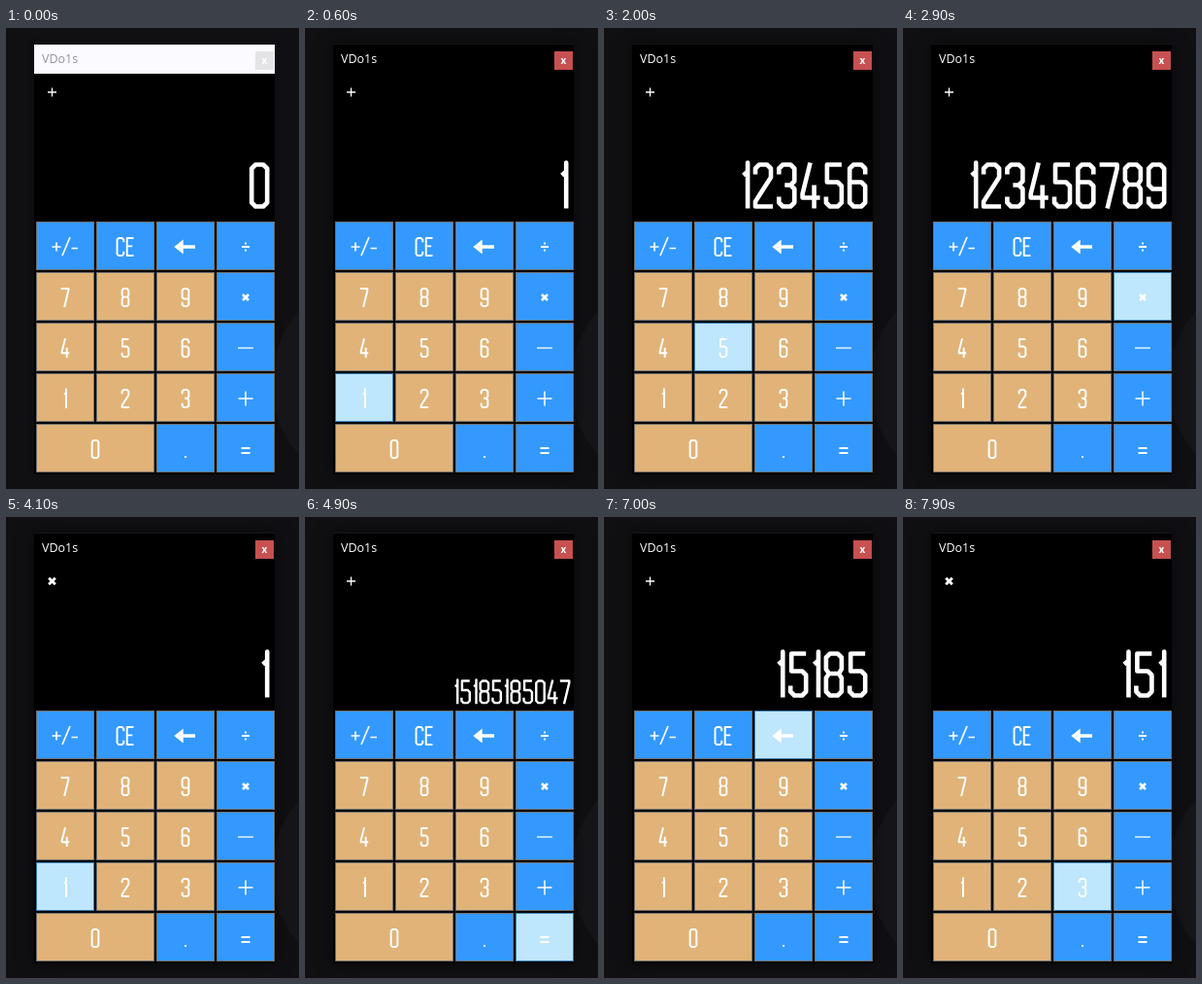
Animation of 302 by 474 pixels, one loop 8 s. Source, as an HTML page with a canvas:

```html
<!DOCTYPE html>
<html lang="en">
<head>
<meta charset="utf-8">
<title>Calculator</title>
<style>
  html, body { margin: 0; width: 100%; height: 100%; overflow: hidden; background: #101013; }
  canvas { display: block; }
</style>
</head>
<body>
<canvas id="stage" width="302" height="474" role="img" aria-label="Calculator multiplying 123456789 by 123"></canvas>
<script>
const ctx = document.getElementById('stage').getContext('2d');
const LOOP = 8000;
const BLUE = '#3399ff', TAN = '#e1b378', LIT = '#bee6fd';

// Condensed squared lettering: centre lines in a 16 x 43 box
const GLYPHS = {
  0: 'M4 0H12L16 4V39L12 43H4L0 39V4Z',
  1: 'M0 11L4.5 7V-2V45',
  2: 'M0 10V4L4 0H12L16 4V13L0 38V43H18',
  3: 'M0 10V4L4 0H12L16 4V17L12 21H6M12 21L16 25V39L12 43H4L0 39V33',
  4: 'M8 -2L0 30V34H18M12 21V45',
  5: 'M16 0H1V18H12L16 22V39L12 43H4L0 39V33',
  6: 'M16 10V4L12 0H4L0 4V39L4 43H12L16 39V22L12 18H0',
  7: 'M-2 0H16V4L6 45',
  8: 'M4 0H12L16 4V16L13 20.5L16 25V39L12 43H4L0 39V25L3 20.5L0 16V4ZM3 20.5H13',
  9: 'M0 33V39L4 43H12L16 39V4L12 0H4L0 4V21L4 25H16',
  C: 'M16 10V4L12 0H4L0 4V39L4 43H12L16 39V33',
  E: 'M16 0H0V43H16M0 20H13'
};
for (const c in GLYPHS) GLYPHS[c] = new Path2D(GLYPHS[c]);
const inkWidth = c => c === '1' ? 4.5 : 16;
const advance = c => c === '1' ? 12.4 : 24.3;

// Symbols as [path, line width], centred on 0,0
const SYMBOLS = {
  '+/-': ['M-13.5 0H-4.5M-9 -4.5V4.5M-3 9L5 -10M6.5 1.5H13', 1.7],
  '÷': ['M-4 0H4M-1 -3.5H1M-1 3.5H1', 1.8],
  '×': ['M-3 -3L3 3M3 -3L-3 3', 2.6],
  '−': ['M-8 0H8', 1.3],
  '+': ['M-7.5 0H7.5M0 -7.5V7.5', 1.5],
  'plus': ['M-4.5 0H4.5M0 -4.5V4.5', 1.3],
  '.': ['M-1 8H1', 2.2],
  '=': ['M-4.5 -1H4.5M-4.5 4H4.5', 2.2],
  '←': ['M10 0H-5M-9 0L-4 -4V4Z', 3.4]
};
for (const s in SYMBOLS) SYMBOLS[s][0] = new Path2D(SYMBOLS[s][0]);

const ROWS = [['+/-', 'CE', '←', '÷'], '789×', '456−', '123+', '0 .='];
const KEYS = ROWS.flatMap((row, r) => [...row].map((label, c) => ({
  label, x: 31 + c * 62, y: 199 + r * 52, w: label === '0' ? 122 : 60
}))).filter(key => key.label !== ' ');

// Timelines of [start ms, value]
const HOVER = [
  [0, ''], [400, '1'], [700, '2'], [900, '3'], [1200, '5'], [1300, '4'],
  [1500, '5'], [1700, '6'], [2000, '5'], [2100, '4'], [2200, '7'], [2400, '8'],
  [2600, '9'], [2900, '×'], [3400, '6'], [3500, '5'], [3600, '2'], [3700, '1'],
  [4200, '2'], [4400, '3'], [4600, '.'], [4700, '='], [5500, '+'], [5600, '−'],
  [5700, '×'], [5800, '←'], [7500, '×'], [7800, '6'], [7900, '3']
];
const DISPLAY = [
  [0, '0'], [500, '1'], [800, '12'], [1100, '123'], [1400, '1234'], [1600, '12345'],
  [1800, '123456'], [2300, '1234567'], [2500, '12345678'], [2800, '123456789'],
  [4100, '1'], [4300, '12'], [4500, '123'], [4900, String(123456789 * 123)],
  // Backspace presses
  ...[6100, 6400, 6500, 6700, 6800, 6900, 7100, 7200].map((t, i) => [t, '15185185047'.slice(0, 10 - i)])
];
const OPERATOR = [[0, 'plus'], [3300, '×'], [4900, 'plus'], [7700, '×']];
const at = (timeline, t) => timeline.findLast(([start]) => start <= t)[1];

function box(x, y, w, h, fill) {
  ctx.fillStyle = fill;
  ctx.fillRect(x, y, w, h);
}

function symbol(name, x, y, scale = 1) {
  const [path, width] = SYMBOLS[name];
  ctx.save();
  ctx.translate(x, y);
  ctx.scale(scale, scale);
  ctx.lineWidth = width;
  ctx.lineJoin = 'miter';
  ctx.stroke(path);
  ctx.restore();
}

// Sets glyphs so that the ink ends at `right`
function lettering(text, right, top, scale) {
  ctx.save();
  ctx.translate(right, top);
  ctx.scale(scale, scale);
  ctx.lineWidth = 4.6;
  ctx.lineJoin = 'round';
  ctx.translate(-2.3 - inkWidth(text.at(-1)), 0);
  for (let i = text.length - 1; i >= 0; i--) {
    ctx.stroke(GLYPHS[text[i]]);
    if (i) ctx.translate(-advance(text[i - 1]), 0);
  }
  ctx.restore();
}

function drawKey({ label, x, y, w }, lit) {
  const cx = x + w / 2, cy = y + 26;
  const warm = /^\d$/.test(label);
  box(x, y, w, 50, lit ? '#3c7fb1' : '#707070');
  box(x + 1, y + 1, w - 2, 48, lit ? LIT : warm ? TAN : BLUE);
  if (SYMBOLS[label]) return symbol(label, cx, cy);
  const ink = (label === 'CE' ? 40.3 : inkWidth(label)) + 4.6;
  lettering(label, cx + ink * 0.21, cy - 9, 0.42);
}

function drawBackground() {
  box(0, 0, 302, 474, '#101013');
  ctx.fillStyle = '#16161a';
  ctx.beginPath();
  ctx.arc(386, 365, 112, 0, Math.PI * 2);
  ctx.fill();
}

function drawWindow(active) {
  ctx.save();
  ctx.shadowColor = active ? 'rgba(0,0,0,.55)' : 'rgba(0,0,0,.25)';
  ctx.shadowBlur = active ? 16 : 6;
  box(29, 16, 248, 443, '#000');
  ctx.restore();
  if (active) box(29, 16, 248, 1, '#161618');
  else box(29, 17, 248, 30, '#fafaff');
  box(257, 24, 19, 19, active ? '#c75050' : '#e4e4e7');
  ctx.textAlign = 'center';
  ctx.font = 'bold 10px "Open Sans", sans-serif';
  ctx.fillStyle = '#fff';
  ctx.fillText('x', 266.5, 36.5);
  ctx.textAlign = 'left';
  ctx.font = '12.5px "Open Sans", sans-serif';
  ctx.fillStyle = active ? '#fff' : '#92929c';
  ctx.fillText('VDo1s', 37, 36);
}

function draw(t) {
  drawBackground();
  drawWindow(t >= 100);
  ctx.strokeStyle = '#fff';
  const operator = at(OPERATOR, t);
  symbol(operator, 47.5, 66, operator === '×' ? 1.1 : 1);
  const value = at(DISPLAY, t);
  if (value.length > 9) lettering(value, 273.5, 168.5, 0.526);
  else lettering(value, 271.5, 140.5, 1);
  const hover = at(HOVER, t);
  for (const key of KEYS) drawKey(key, key.label === hover);
}

function frame() {
  draw(performance.now() % LOOP);
  requestAnimationFrame(frame);
}
frame();
</script>
</body>
</html>
```
